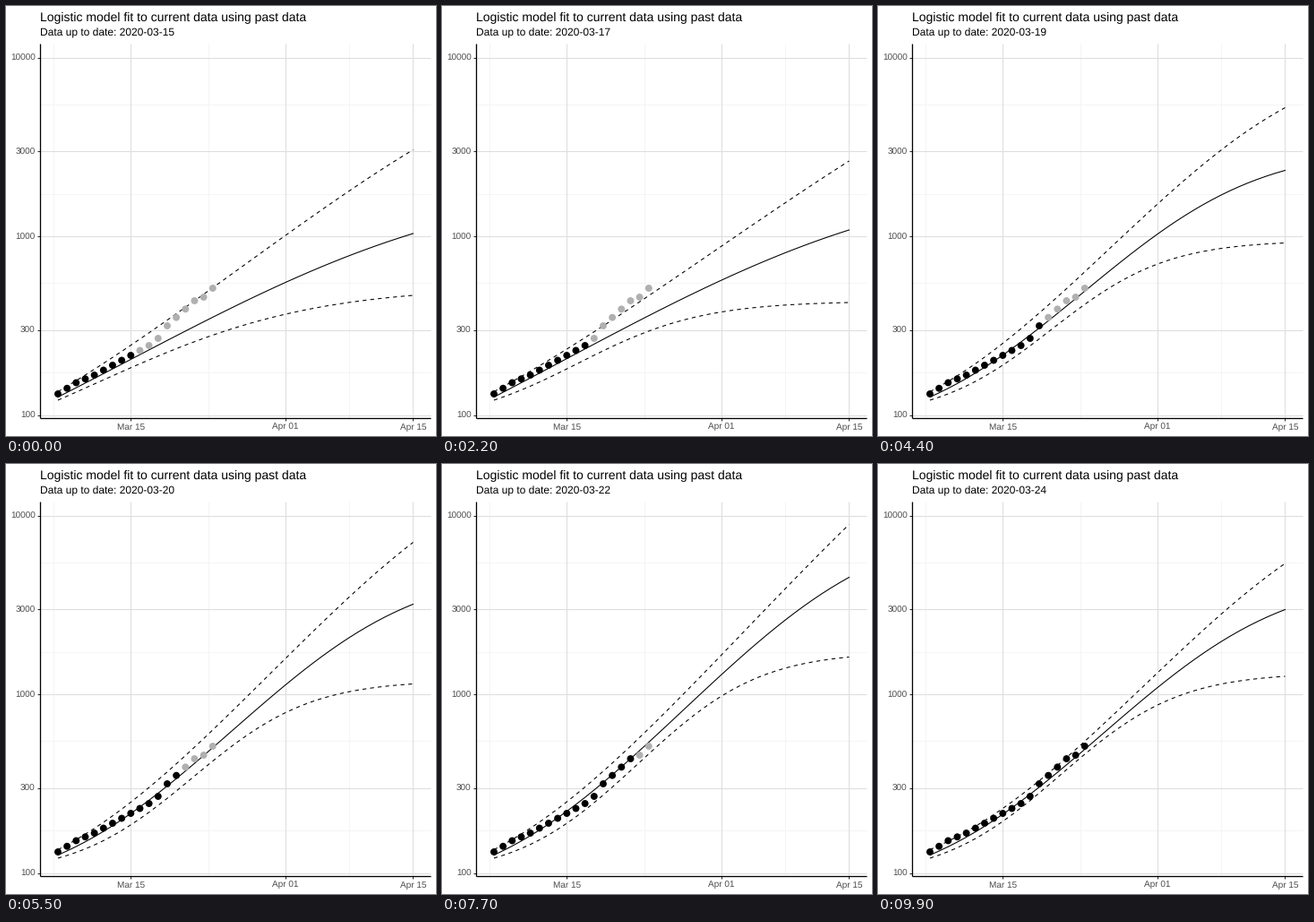
These frames come from a looping animation (480x480 px, 10 s). A matplotlib script:

```python
import matplotlib.pyplot as plt
import numpy as np
from matplotlib.animation import FuncAnimation

plt.rcParams.update({"font.family": "Liberation Sans", "text.hinting": "none",
                     "text.hinting_factor": 1})

LEFT, RIGHT, TOP, BOTTOM = 38, 474, 42, 460
GREY, TICK, MAJOR, MINOR = "#4d4d4d", "#333333", "#dedede", "#f5f5f5"
FRAMES, HOLD = 100, 11
BASE_Y, DECADE = 456.6, 199.2


def day_x(day):
    """Day counted from March 1 -> pixel column."""
    return 139.3 + 10.165 * (day - 15)


def value_y(value):
    """Case count -> pixel row on the log axis."""
    return BASE_Y - DECADE * (np.log10(value) - 2)


def y_value(y):
    return 10 ** (2 + (BASE_Y - np.asarray(y)) / DECADE)


# Reported cases: stretches of steady growth between a few turning days
DAYS = np.arange(7, 25)
DOT_Y = np.interp(DAYS, [7, 9, 11, 17, 18, 19, 22, 23, 24],
                  [433, 420.5, 412, 379, 371, 357, 329, 325, 315])

# Per curve: start height, growth rate on three days,
# then the forecast heights for Apr 1 and Apr 15 on each fit day
RATE_DAYS = [15, 17, 19]
FIT_DAYS = [15, 17, 18, 19, 20, 22, 24]
FITS = {
    "mid": (436.5, [0.075, 0.075, 0.132],
            [308.5, 306, 295, 254.5, 246.5, 235, 249.5],
            [254, 250, 238.5, 183.5, 156.5, 126.5, 162.5]),
    "high": (430.5, [0.094, 0.088, 0.13],
             [256, 268, 264.5, 221, 217, 213, 233],
             [160.5, 173, 178.5, 113.5, 87.5, 67.5, 111]),
    "low": (440, [0.095, 0.155, 0.175],
            [344, 341.5, 326, 288, 277.5, 259, 269],
            [323, 331, 315, 264.5, 245.5, 215.5, 237]),
}
SPAN = np.arange(40)
APR1, APR15 = 25, 39


def curve(name, last_day):
    """Logistic growth through the start and both forecast values."""
    start, rates, near, far = FITS[name]
    rate = np.interp(last_day, RATE_DAYS, rates)
    n0, n1, n2 = y_value([start, np.interp(last_day, FIT_DAYS, near),
                          np.interp(last_day, FIT_DAYS, far)])
    q = np.exp(-rate * SPAN)
    q1, q2 = q[APR1], q[APR15]
    part = (n1 - n0) / (n2 - n0)
    ramp = (1 - q) / (1 - q2)
    a = (ramp[APR1] - part) / (part * q1 - ramp[APR1] * q2)
    return value_y(n0 + (n2 - n0) * ramp * (1 + a * q2) / (1 + a * q))


fig = plt.figure(figsize=(480 / 72, 480 / 72), dpi=72, facecolor="white")
ax = fig.add_axes([0, 0, 1, 1])
ax.set(xlim=(0, 480), ylim=(480, 0))
ax.axis("off")


def rule(x0, y0, x1, y1, color, z=1, lw=1.1):
    ax.plot([x0, x1], [y0, y1], color=color, lw=lw, zorder=z,
            solid_capstyle="butt")


def hline(y, color, z):
    rule(LEFT, y, RIGHT, y, color, z)


def vline(x, color, z):
    rule(x, TOP, x, BOTTOM, color, z)


Y_BREAKS = [100, 300, 1000, 3000, 10000]
X_BREAKS = {15: "Mar 15", 32: "Apr 01", 46: "Apr 15"}

# Minor grid
for a, b in zip(Y_BREAKS, Y_BREAKS[1:]):
    hline(value_y(np.sqrt(a * b)), MINOR, 0)
for day in (6.5, 23.5, 39):
    vline(day_x(day), MINOR, 0)

# Major grid, ticks and labels
for value in Y_BREAKS:
    y = value_y(value)
    hline(y, MAJOR, 1)
    rule(LEFT - 3, y, LEFT, y, TICK, 4)
    ax.text(32.6, y + 3.2, str(value), size=9.6, color=GREY, ha="right")
for day, label in X_BREAKS.items():
    x = day_x(day)
    vline(x, MAJOR, 1)
    rule(x, BOTTOM, x, BOTTOM + 3, TICK, 4)
    ax.text(x, 473, label, size=9.6, color=GREY, ha="center")

# Axis lines
rule(LEFT, BOTTOM, RIGHT, BOTTOM, "black", 4, 1.3)
rule(LEFT, TOP, LEFT, BOTTOM, "black", 4, 1.3)

ax.text(LEFT, 17.5, "Logistic model fit to current data using past data",
        size=14.4)
subtitle = ax.text(LEFT, 34, "", size=12)

lines = {}
for name in FITS:
    style = "-" if name == "mid" else (0, (4, 4))
    lines[name], = ax.plot([], [], color="black", lw=1.07, ls=style, zorder=2)
dots = ax.scatter(day_x(DAYS), DOT_Y, s=7.9 ** 2, linewidths=0, zorder=3)


def draw(frame):
    last_day = 15 + frame // HOLD
    subtitle.set_text(f"Data up to date: 2020-03-{last_day}")
    for name, line in lines.items():
        line.set_data(day_x(7 + SPAN), curve(name, last_day))
    dots.set_facecolor(["black" if d <= last_day else "#b0b0b0" for d in DAYS])
    return [subtitle, dots, *lines.values()]


anim = FuncAnimation(fig, draw, frames=FRAMES, interval=100,
                     repeat=True, repeat_delay=0)
plt.show()
```
